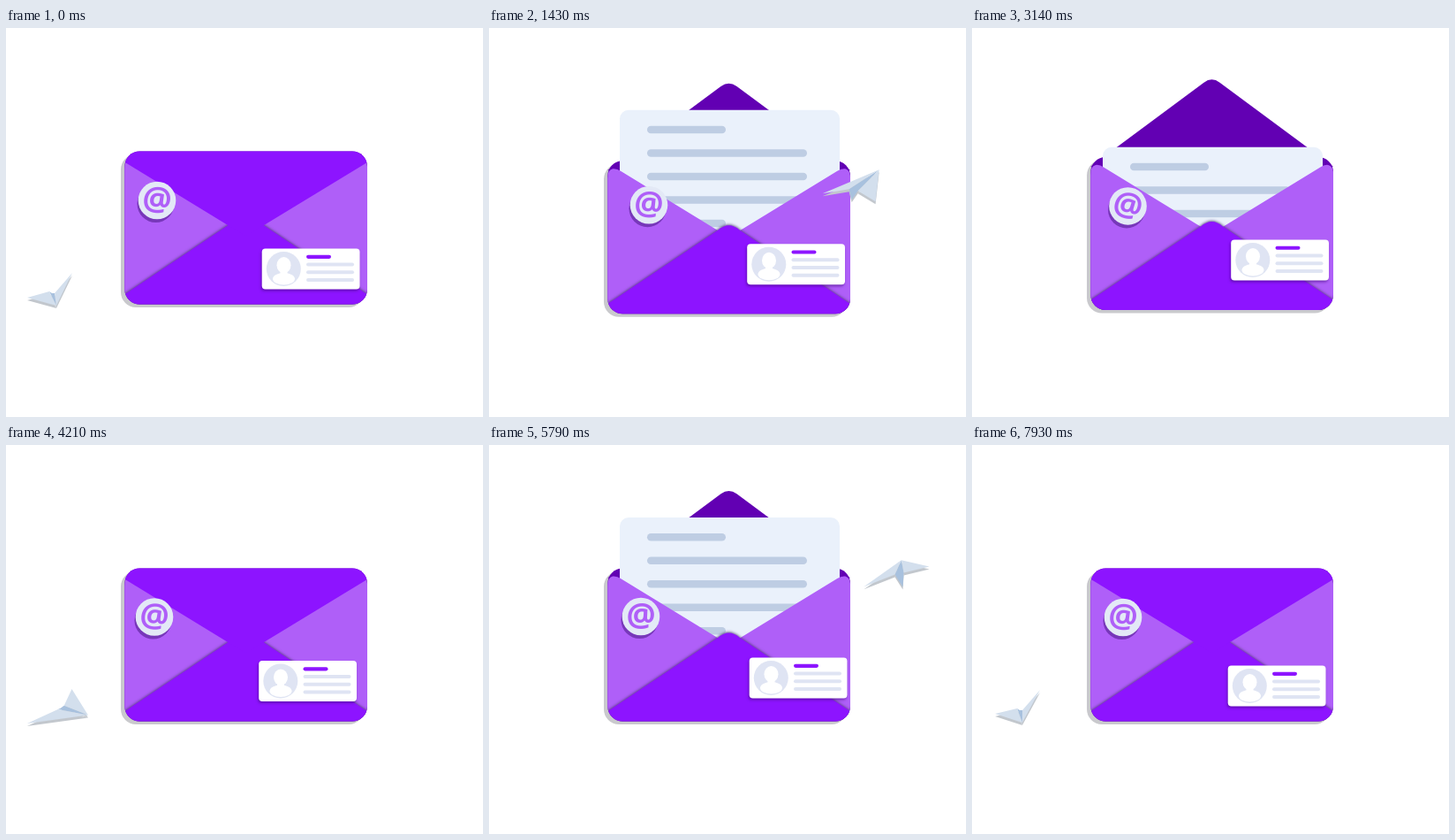
These frames come from a looping animation (540x440 px, 8 s). An HTML page with a canvas:

```html
<!DOCTYPE html>
<html lang="en">
<head>
<meta charset="utf-8">
<title>Mail envelope</title>
<style>
html, body { margin: 0; width: 100%; height: 100%; overflow: hidden; background: #fff; }
canvas { display: block; width: 540px; height: 440px; }
</style>
</head>
<body>
<canvas id="stage"></canvas>
<script>
const W = 540, H = 440, LOOP = 8000, FLIGHT = 4000, STEP = LOOP / 112;
const PURPLE = '#8d14ff', LIGHT = '#af5ff8', DARK = '#6200b3';
const PAPER = '#eaf1fb', RULE = '#becde3', PALE = '#dfe4f3', GRAY = '#c9c9cd';
const canvas = document.getElementById('stage');
const dpr = window.devicePixelRatio || 1;
canvas.width = W * dpr;
canvas.height = H * dpr;
const c = canvas.getContext('2d');

// time, badge x, y, tilt, card x, y
const DRIFT = [
  [0, 171, 195, 5, 345, 272.5],
  [1430, 181, 189.5, 3, 347.5, 256.5],
  [3140, 176.5, 195, 14, 348.5, 256],
  [4210, 168, 194.5, 5, 341.5, 267],
  [5790, 172, 194, 0, 350, 263.5],
  [6860, 180.5, 187.5, 14, 345, 265],
  [7930, 171, 195, 5, 345, 272.5]
];

// time, nose, left wing, right wing, left fold, right fold, keel
const PLANE = [
  [0, 57, 314, 75, 277, 24, 305, 55, 300, 49, 298, 52, 300],
  [210, 92, 306, 74, 276, 23, 315, 65, 295, 58, 299, 61, 298],
  [800, 230, 244, 172, 255, 187, 290, 190, 268, 196, 275, 186, 274],
  [1430, 442, 160, 378, 187, 438, 196, 408, 182, 418, 184, 411, 194],
  [1790, 467, 130, 425, 160, 499, 137, 460, 146, 470, 144, 469, 160],
  [2000, 468, 116, 450, 150, 505, 120, 470, 131, 477, 127, 480, 143],
  [2300, 412, 114, 455, 143, 462, 106, 448, 125, 450, 120, 460, 132],
  [2600, 330, 135, 370, 175, 385, 135, 365, 150, 368, 145, 375, 160],
  [3430, 86, 262, 130, 285, 125, 250, 118, 268, 120, 262, 125, 275],
  [3710, 46, 302, 85, 285, 45, 282, 60, 290, 55, 287, 58, 289],
  [3930, 57, 314, 77, 277, 26, 304, 57, 300, 51, 298, 54, 300]
];

const clamp = v => Math.max(0, Math.min(1, v));
const ease = (t, a, b) => (1 - Math.cos(Math.PI * clamp((t - a) / (b - a)))) / 2;

// smooth periodic curve through all keys
function sample(keys, t, period) {
  const n = keys.length;
  let i = n - 1;
  while (i > 0 && keys[i][0] > t) i--;
  const key = j => keys[(j + n) % n];
  const time = j => key(j)[0] + period * Math.floor(j / n);
  const t0 = time(i), t1 = time(i + 1), d = t1 - t0, u = (t - t0) / d;
  const slope = (j, k) => (key(j + 1)[k] - key(j - 1)[k]) / (time(j + 1) - time(j - 1));
  return key(i).slice(1).map((a, m) => {
    const k = m + 1, b = key(i + 1)[k];
    return a * (1 + 2 * u) * (1 - u) ** 2 + b * u * u * (3 - 2 * u)
      + d * (slope(i, k) * u * (1 - u) ** 2 + slope(i + 1, k) * u * u * (u - 1));
  });
}

function poly(points, color) {
  c.beginPath();
  points.forEach(p => c.lineTo(p[0], p[1]));
  c.closePath();
  c.fillStyle = color;
  c.fill();
}

function box(x, y, w, h, r, color) {
  c.beginPath();
  c.roundRect(x, y, w, h, r);
  c.fillStyle = color;
  c.fill();
}

function oval(x, y, rx, ry, color) {
  c.beginPath();
  c.ellipse(x, y, rx, ry, 0, 0, 7);
  c.fillStyle = color;
  c.fill();
}

function shadow(color, blur, x, y) {
  c.shadowColor = color;
  c.shadowBlur = blur * dpr;
  c.shadowOffsetX = x * dpr;
  c.shadowOffsetY = y * dpr;
}

const noShadow = () => shadow('transparent', 0, 0, 0);

function bodyPath() {
  c.beginPath();
  c.roundRect(134.3, 139.5, 274.7, 173, 17);
}

function drawPlane(t) {
  const v = sample(PLANE, t, FLIGHT);
  const [nose, left, right, foldL, foldR, keel] =
    [0, 2, 4, 6, 8, 10].map(i => [v[i], v[i + 1]]);
  const parts = [[nose, left, foldL], [nose, right, foldR], [nose, foldL, keel, foldR]];
  c.save();
  c.translate(0, 3);
  parts.forEach(p => poly(p, '#c2c7cd'));
  c.restore();
  poly(parts[2], '#a8c1de');
  poly(parts[0], '#d3dfed');
  poly(parts[1], '#d3dfed');
}

function drawOpenFlap(s) {
  const base = 150.4, x = 271.5, tip = base - 101.8 * s, cut = 9;
  const near = tip + cut * 0.743 * s;
  c.beginPath();
  c.moveTo(134.3, base);
  c.lineTo(x - cut, near);
  c.quadraticCurveTo(x, tip, x + cut, near);
  c.lineTo(409, base);
  c.closePath();
  c.fillStyle = DARK;
  c.fill();
}

function drawLetter(drop) {
  c.save();
  c.translate(0, drop);
  box(148, 82, 249, 154, 10, PAPER);
  [89, 181, 181, 181, 89].forEach((w, i) => box(179, 100 + i * 26.5, w, 8.5, 4.25, RULE));
  c.restore();
}

function drawSide() {
  c.beginPath();
  c.moveTo(134, 160);
  c.quadraticCurveTo(134, 150, 140, 148.5);
  c.quadraticCurveTo(145, 148, 149, 151);
  c.lineTo(266, 222.5);
  c.lineTo(266, 312);
  c.lineTo(134, 312);
  c.closePath();
  c.fillStyle = LIGHT;
  c.fill();
}

function drawFront() {
  c.save();
  bodyPath();
  c.clip();
  drawSide();
  c.translate(543.3, 0);
  c.scale(-1, 1);
  drawSide();
  c.restore();

  c.save();
  bodyPath();
  c.clip();
  shadow('rgba(75,55,115,.8)', 3, 0, -1);
  c.beginPath();
  c.moveTo(134, 301.5);
  c.lineTo(259, 218);
  c.quadraticCurveTo(271.5, 207, 284, 218);
  c.lineTo(410, 302);
  c.lineTo(410, 315);
  c.lineTo(134, 315);
  c.closePath();
  c.fillStyle = PURPLE;
  c.fill();
  c.restore();
}

function drawClosedFlap(s) {
  c.save();
  bodyPath();
  c.clip();
  poly([[134, 139], [410, 139], [410, 151.5], [271.5, 151.5 + 84 * s], [134, 151.5]], PURPLE);
  c.restore();
}

function drawBadge(x, y, tilt) {
  c.save();
  c.translate(x, y);
  oval(-1.5, 4, 21, 21, 'rgba(101,42,165,.75)');
  oval(0, 0, 21.3, 21.3, '#e3e9f6');
  c.rotate(tilt * Math.PI / 180);
  c.font = 'bold 37px "Open Sans", "Noto Sans", sans-serif';
  c.textAlign = 'center';
  c.textBaseline = 'alphabetic';
  c.fillStyle = LIGHT;
  c.fillText('@', 0, 11.5);
  c.restore();
}

function drawCard(x, y) {
  c.save();
  c.translate(x, y);
  shadow('rgba(70,10,130,.55)', 3, -1, 2);
  box(-55.3, -23, 110.8, 46, 4, '#fff');
  noShadow();
  oval(-30.7, 0, 19.5, 19.5, PALE);
  oval(-30.5, -4.2, 8, 9.2, '#fff');
  box(-34.5, 1, 8, 8, 2, '#fff');
  oval(-30.5, 11.3, 12.5, 6.8, '#fff');
  box(-5, -15.8, 28, 4.2, 2.1, PURPLE);
  [-7, 1.8, 10.5].forEach(ly => box(-5, ly, 54, 4, 2, PALE));
  c.restore();
}

function draw(t) {
  const f = t % FLIGHT;
  const bob = t < FLIGHT ? 15 * (1 - Math.abs(t / 2000 - 1)) : 0;
  const flap = -Math.cos(Math.PI * (ease(f, 230, 640) - ease(f, 3290, 3720)));
  const drop = 72 * (1 - ease(f, 640, 1250) + ease(f, 2870, 3330));
  const [bx, by, tilt, cx, cy] = sample(DRIFT, t, LOOP);
  const behind = f > 2050 && f < 3900;

  c.setTransform(dpr, 0, 0, dpr, 0, 0);
  c.fillStyle = '#fff';
  c.fillRect(0, 0, W, H);
  if (behind) drawPlane(f);
  c.save();
  c.translate(0, bob);
  box(130, 143, 275, 173, 17, GRAY);
  bodyPath();
  c.fillStyle = DARK;
  c.fill();
  if (flap > 0) drawOpenFlap(flap);
  drawLetter(drop);
  drawFront();
  if (flap <= 0) drawClosedFlap(-flap);
  drawBadge(bx, by, tilt);
  drawCard(cx, cy);
  c.restore();
  if (!behind) drawPlane(f);
}

const start = performance.now();
function tick() {
  const ms = (performance.now() - start) % LOOP;
  draw(Math.floor((ms + 4) / STEP) * STEP % LOOP);
  requestAnimationFrame(tick);
}
tick();
</script>
</body>
</html>
```
